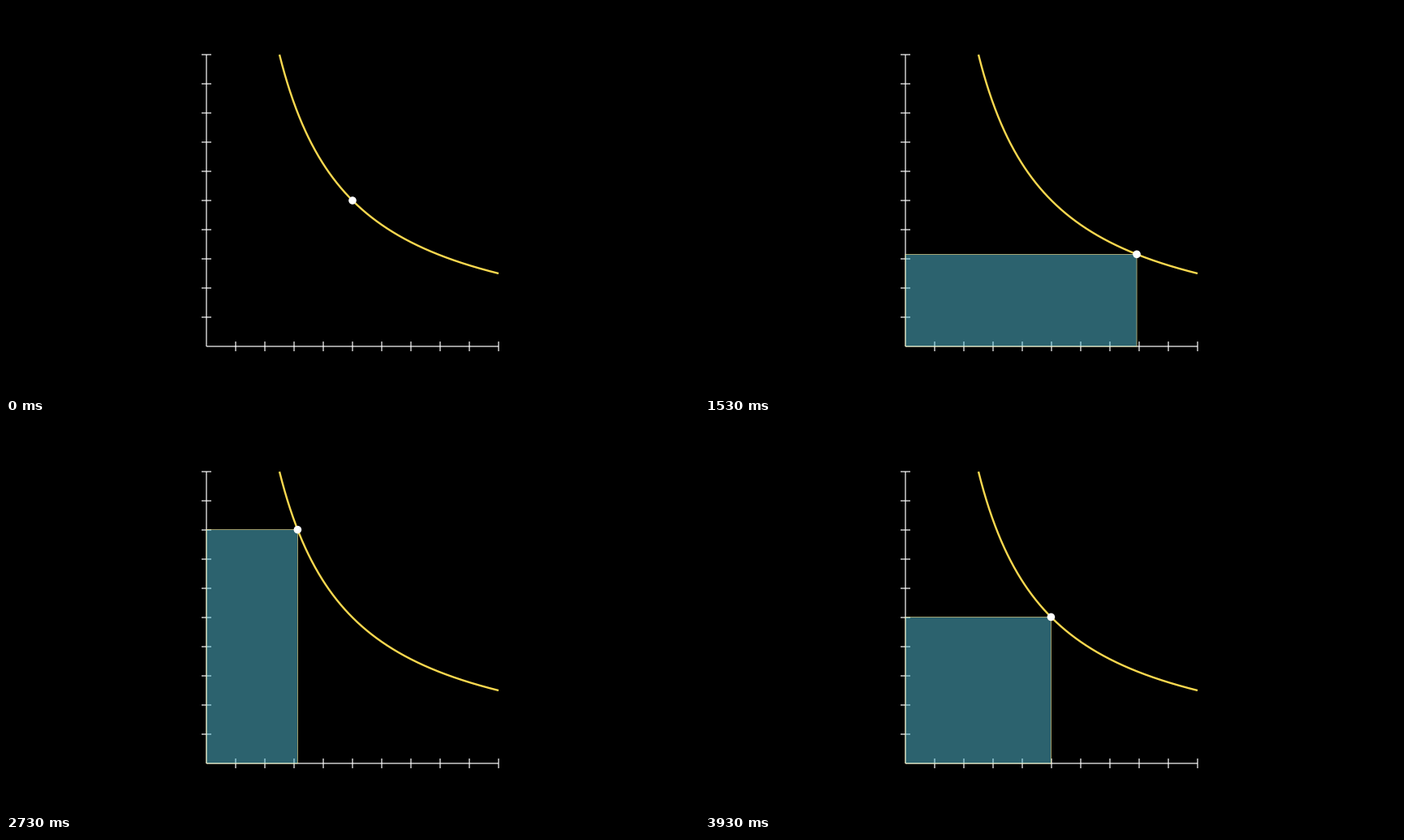
Write a matplotlib script that moves like this. It is 854 by 480 pixels and loops after 3.99 s.

```python
import numpy as np
import matplotlib.pyplot as plt
from matplotlib.animation import FuncAnimation
from matplotlib.patches import Circle, PathPatch
from matplotlib.path import Path

W, H, DPI = 854, 480, 64
PX = 72 / DPI                 # one pixel in points
LOOP, FRAMES = 3990, 60
PER_MOVE = 15                 # frames in each move
X0, Y0, UNIT = 247, 420, 36   # axes origin and unit in pixels
K = 25                        # the curve is y = K / x

WHITE = "#ffffff"
GOLD = "#f9d84f"
EDGE = "#ffea94"
FILL = (88 / 255, 196 / 255, 221 / 255, 0.5)

plt.rcParams["path.snap"] = False
fig = plt.figure(figsize=(W / DPI, H / DPI), dpi=DPI, facecolor="black")
ax = fig.add_axes([0, 0, 1, 1])
ax.set(xlim=(0, W), ylim=(H, 0))
ax.axis("off")


def to_px(x, y):
    return X0 + UNIT * x, Y0 - UNIT * y


def line(xs, ys, color, width, z=1):
    ax.plot(xs, ys, color=color, lw=width * PX, zorder=z,
            solid_capstyle="butt", solid_joinstyle="miter")


def smooth(a, steep=10):
    """Sigmoid easing, rescaled to run exactly from 0 to 1."""
    def sig(v):
        return 1 / (1 + np.exp(-v))
    low = sig(-steep / 2)
    return (sig(steep * (a - 0.5)) - low) / (1 - 2 * low)


def corners(x):
    """Closed outline, starting at the point on the curve."""
    y = K / x
    return np.array([to_px(*p) for p in [(x, y), (0, y), (0, 0), (x, 0), (x, y)]])


def partial(pts, a):
    """First part of an outline; every edge takes an equal share."""
    pos = a * (len(pts) - 1)
    i = min(int(pos), len(pts) - 2)
    end = pts[i] + (pts[i + 1] - pts[i]) * (pos - i)
    return np.vstack([pts[:i + 1], end])


# axes
x_end, y_end = to_px(10, 10)
line([X0, x_end], [Y0, Y0], WHITE, 1.2)
line([X0, X0], [Y0, y_end], WHITE, 1.2)
for n in range(1, 11):
    tx, ty = to_px(n, n)
    line([tx, tx], [Y0 - 6, Y0 + 6], WHITE, 1.2)
    line([X0 - 6, X0 + 6], [ty, ty], WHITE, 1.2)

# curve
xs = np.linspace(K / 10, 10, 500)
line(*to_px(xs, K / xs), GOLD, 2.4, z=2)

# moving parts
rect = PathPatch(Path(corners(5)), facecolor=FILL, edgecolor=EDGE, lw=0.6 * PX,
                 capstyle="butt", joinstyle="miter", zorder=3)
dot = Circle(to_px(5, 5), 4.8, facecolor=WHITE, lw=0, zorder=10)
ax.add_patch(rect)
ax.add_patch(dot)

STOPS = [5, 5, 10, K / 10, 5]


def update(i):
    move, step = divmod(i, PER_MOVE)
    a = smooth(step / PER_MOVE)
    x = STOPS[move] + (STOPS[move + 1] - STOPS[move]) * a
    pts = corners(x)
    rect.set_path(Path(partial(pts, a) if move == 0 else pts))
    rect.set_visible(i > 0)
    dot.center = to_px(x, K / x)
    return rect, dot


anim = FuncAnimation(fig, update, frames=FRAMES, init_func=lambda: update(0),
                     interval=LOOP / FRAMES, repeat=True, repeat_delay=0, blit=False)
plt.show()
```
